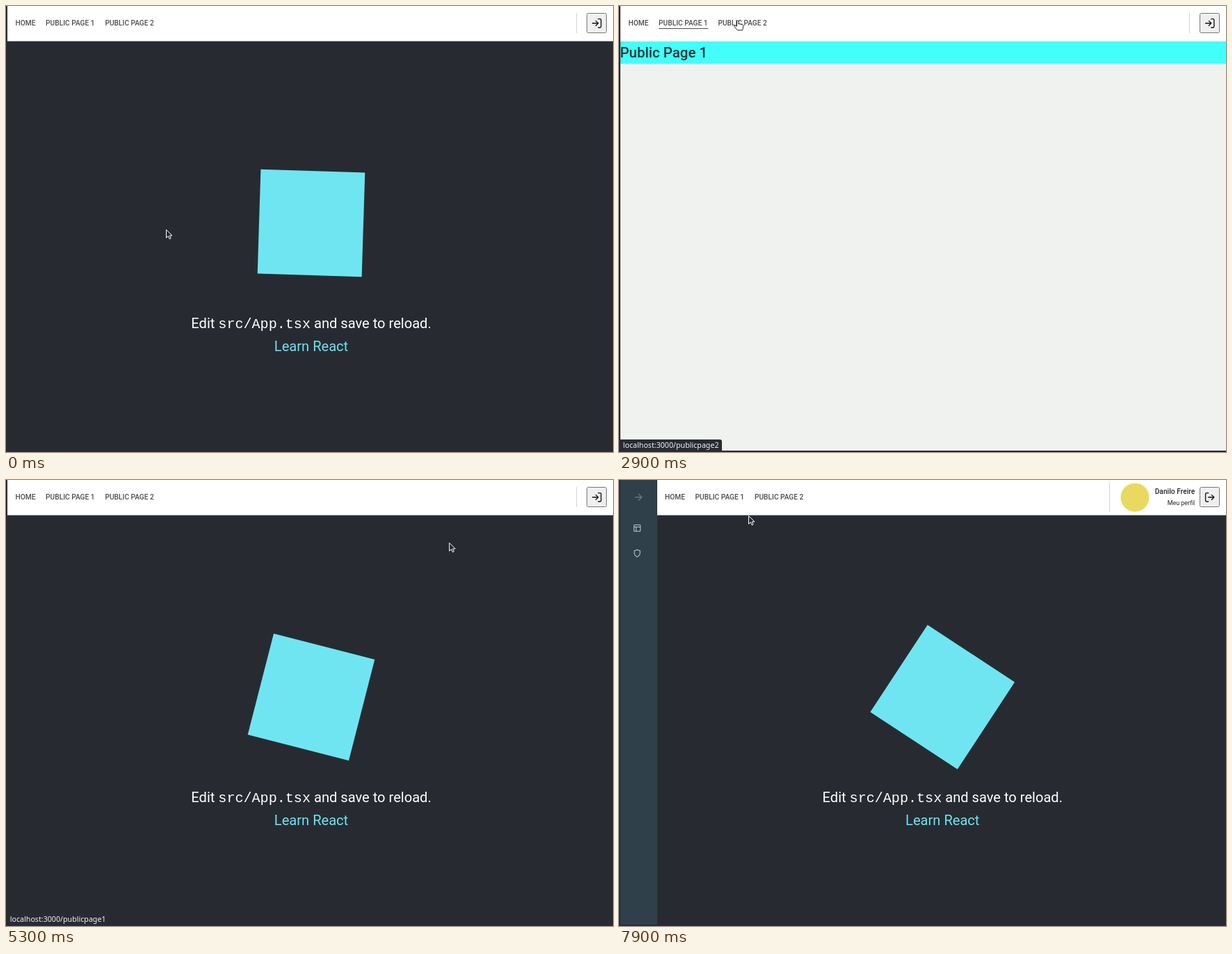
These frames come from a looping animation (873 px wide and 641 px high, 8000 ms). An HTML page:

```html
<!DOCTYPE html>
<html lang="en">
<head>
<meta charset="utf-8">
<title>Demo app</title>
<style>
  html, body { margin: 0; width: 100%; height: 100%; overflow: hidden; background: #272b33; }
  svg { display: block; width: 873px; height: 641px; font-family: Roboto, sans-serif; }
  text { white-space: pre; }
  .nav text { font-size: 10.2px; font-weight: 500; fill: #4b4e51; }
  .icon { fill: none; stroke-width: 2; stroke-linecap: round; stroke-linejoin: round; }
  .intro { font-size: 20.1px; text-anchor: middle; fill: #fff; }
  .mono { font-family: "Liberation Mono", monospace; }
  .user { text-anchor: end; fill: #24282c; }
  #hint { font: 10.67px "Noto Sans", sans-serif; fill: #f2f2f2; }
</style>
</head>
<body>
<svg viewBox="0 0 873 641">
  <rect width="873" height="641" fill="#2a2b3d"/>

  <g id="home">
    <rect x="1" y="50" width="872" height="589" fill="#272b31"/>
    <g id="hero">
      <rect id="logo" x="-75" y="-75" width="150" height="150" fill="#70e5f2"/>
      <text class="intro" y="463">Edit <tspan class="mono">src/App.tsx</tspan> and save to reload.</text>
      <text class="intro" y="496" style="fill:#6be4f3">Learn React</text>
    </g>
  </g>

  <g id="public">
    <rect width="873" height="641" fill="#272b33"/>
    <rect x="2" y="50" width="871" height="589" fill="#f0f2f0"/>
    <rect id="band" x="2" y="51" width="871" height="32"/>
    <text id="title" x="1.5" y="73.5" font-size="20.48" font-weight="500" fill="#2f3338"></text>
  </g>

  <rect x="2" width="871" height="50.6" fill="#fefffe"/>
  <g class="nav" id="nav">
    <text x="13.6" y="28.3">HOME</text>
    <text x="57.1" y="28.3">PUBLIC PAGE 1</text>
    <text x="142.4" y="28.3">PUBLIC PAGE 2</text>
    <rect id="underline" y="32" width="71" height="1" fill="#4b4e51"/>
  </g>
  <rect id="divider" width="1" fill="#d0d2d0"/>
  <rect id="button" x="835.5" y="10.5" width="28" height="28" rx="2" stroke="#767676"/>
  <g class="icon" stroke="#111" transform="translate(841.5 16.6) scale(.683)">
    <path id="loginIcon" d="M15 3h4a2 2 0 0 1 2 2v14a2 2 0 0 1-2 2h-4M10 17l5-5-5-5M15 12H3"/>
    <path id="logoutIcon" d="M9 21H5a2 2 0 0 1-2-2V5a2 2 0 0 1 2-2h4M16 17l5-5-5-5M21 12H9"/>
  </g>

  <g id="member">
    <rect x="2" width="53" height="639" fill="#2f404a"/>
    <g class="icon">
      <path stroke="#6d777b" transform="translate(20.2 16.8) scale(.66)" d="M5 12h14M12 5l7 7-7 7"/>
      <path stroke="#c3cacd" transform="translate(20 63) scale(.51)"
        d="M5 3h14a2 2 0 0 1 2 2v14a2 2 0 0 1-2 2H5a2 2 0 0 1-2-2V5a2 2 0 0 1 2-2zM3 9h18M9 21V9"/>
      <path stroke="#c3cacd" transform="translate(20 99.2) scale(.51)"
        d="M12 22s8-4 8-10V5l-8-3-8 3v7c0 6 8 10 8 10z"/>
    </g>
    <circle cx="742" cy="25" r="20.5" fill="#e9d95f"/>
    <text class="user" x="828.3" y="20.4" font-size="10.24" font-weight="500">Danilo Freire</text>
    <text class="user" x="828.3" y="35.8" font-size="8.96">Meu perfil</text>
  </g>

  <g id="status">
    <path id="statusBox" fill="#272b33"/>
    <text id="hint" x="5.8" y="634.5"></text>
  </g>

  <g id="cursor">
    <path id="arrow" fill="#26292e" stroke="#fff" stroke-linejoin="round"
      d="M.5 .5V12.2L3.3 9.7 5.2 13.8 7.1 12.9 5.3 9H9z"/>
    <path id="hand" fill="#fff" stroke="#222" stroke-linejoin="round"
      d="M-1.5 8V1.2a1.25 1.25 0 0 1 2.5 0V5q2.5-1 3.3 .4 3.3-.8 3.3 1.2V9.5q0 2-1.3 4.3H-.4L-5.3 8.6q-.3-1.6 1.5-1.4z"/>
  </g>
</svg>
<script>
const $ = id => document.getElementById(id);
const LOOP = 8000, STEP = 100, SPIN = 360 / 20000;

// each page opens at a time; its logo spins from then on
const visits = [
  { at: -100, page: 0 },
  { at: 1700, page: 1 },
  { at: 3200, page: 2 },
  { at: 4500, page: 0 },
  { at: 6050, page: 0, member: true }
];
// pointer moves to x, y; bend bows the way downwards
const moves = [
  { at: 100, end: 900, x: 28, y: 16 },
  { at: 1300, end: 1600, x: 92, y: 22 },
  { at: 2200, end: 2600, x: 171, y: 21 },
  { at: 3600, end: 4300, x: 32, y: 23 },
  { at: 4500, end: 5700, x: 849, y: 20, bend: 95 },
  { at: 6900, end: 7900, x: 186, y: 51, bend: -15 }
];
const hints = [
  { at: 0, text: "" },
  { at: 1000, text: "/publicpage1" },
  { at: 2300, text: "/publicpage2" },
  { at: 3900, text: " " },
  { at: 4800, text: "/publicpage1" },
  { at: 5500, text: "" }
];
const bands = ["", "#42fffa", "#8311d3"];

const current = (list, t) => list.filter(e => e.at <= t).pop();
const show = (id, on) => $(id).style.display = on ? "" : "none";
const set = (id, attrs) => { for (const k in attrs) $(id).setAttribute(k, attrs[k]); };
const smooth = k => k * k * (3 - 2 * k);

function pointer(t) {
  let x = 230, y = 321;
  for (const m of moves.filter(m => m.at < t)) {
    const k = smooth(Math.min(1, (t - m.at) / (m.end - m.at)));
    x += (m.x - x) * k;
    y += (m.y - y) * k + (m.bend || 0) * Math.sin(Math.PI * k);
  }
  return [x, y];
}

function draw(t) {
  const { at, page, member } = current(visits, t);
  const hint = current(hints, t).text;
  const shift = member ? 52.5 : 0;
  const links = [...document.querySelectorAll("#nav text")];
  const left = links.map(el => +el.getAttribute("x"));

  show("home", !page);
  show("public", page);
  show("underline", page);
  set("hero", { transform: `translate(${439 + shift / 2} 0)` });
  set("logo", { transform: `translate(0 312) rotate(${(t - at) * SPIN})` });
  $("title").textContent = "Public Page " + page;
  set("band", { fill: bands[page] });
  set("underline", { x: left[page] });
  set("nav", { transform: `translate(${shift} 0)` });
  links.forEach((el, i) => el.setAttribute("y", page && i === page ? 27.6 : 28.3));

  show("member", member);
  show("loginIcon", !member);
  show("logoutIcon", member);
  set("divider", member ? { x: 705, y: 3, height: 43 } : { x: 820, y: 10, height: 29 });

  show("status", hint);
  $("hint").textContent = "localhost:3000" + hint;
  set("statusBox", { d: `M0 623H${hint === " " ? 79 : 145}q3 0 3 3V639H0z` });

  const [x, y] = pointer(t);
  const onButton = Math.abs(x - 849.5) < 14 && Math.abs(y - 24.5) < 14;
  const onLink = y > 15 && y < 34 &&
    left.some((l, i) => x > l + shift && x < l + shift + (i ? 71 : 29));
  set("button", { fill: onButton ? "#e2e2e2" : "#efefef" });
  set("cursor", { transform: `translate(${x} ${y})` });
  show("hand", onButton || onLink);
  show("arrow", !onButton && !onLink);
}

const start = performance.now();
function tick() {
  const t = (performance.now() - start) % LOOP;
  draw(Math.floor(t / STEP) * STEP);
  requestAnimationFrame(tick);
}
tick();
</script>
</body>
</html>
```
